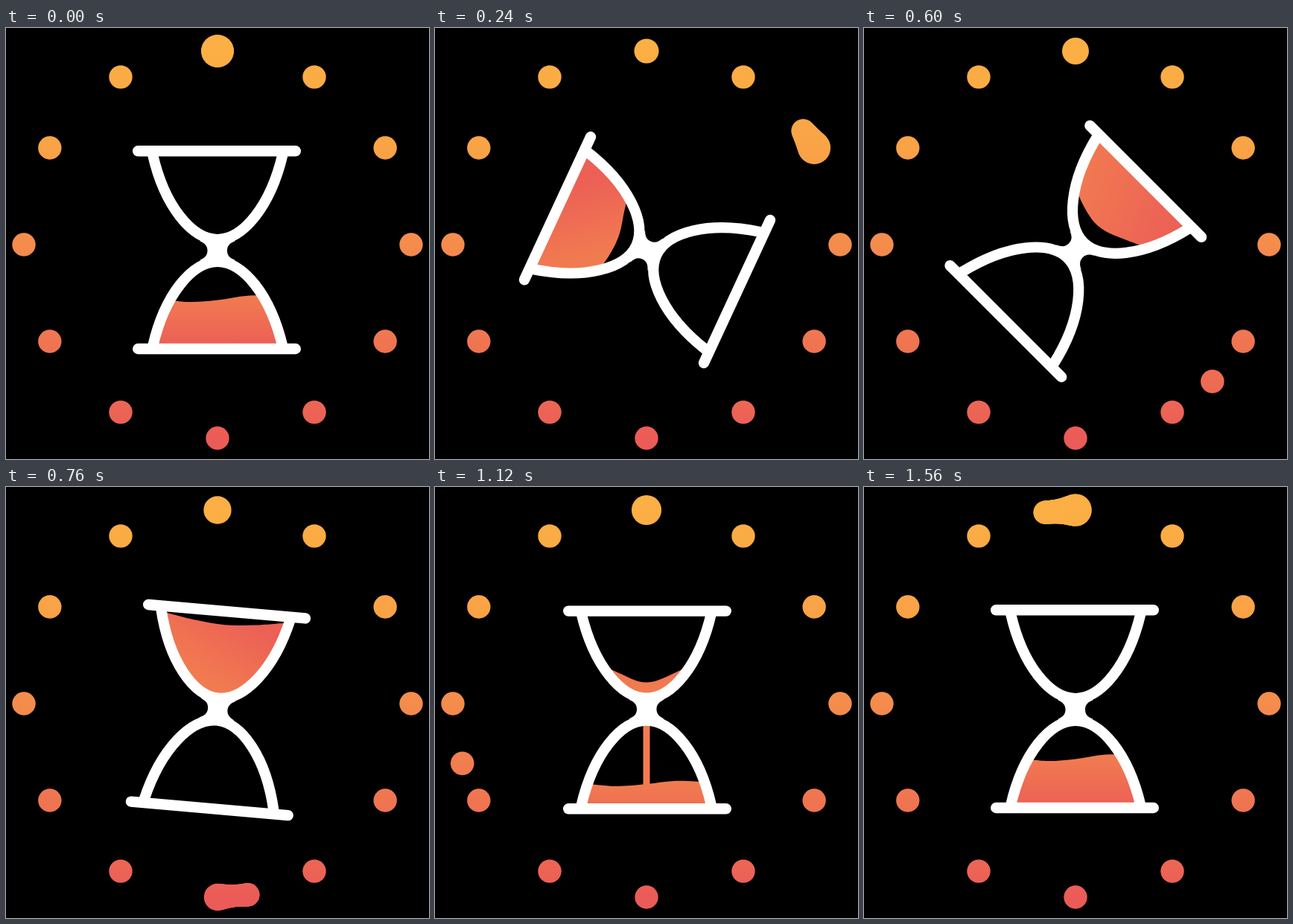
Recreate the animation shown at these times as an HTML page with a canvas. Size 568x579 px, loop 1600 ms.

```html
<!DOCTYPE html>
<html lang="en">
<head>
<meta charset="utf-8">
<title>Hourglass loader</title>
<style>
html, body { margin: 0; width: 100%; height: 100%; overflow: hidden; background: #000; }
canvas { display: block; }
</style>
</head>
<body>
<canvas id="stage" width="568" height="579"></canvas>
<script>
const ctx = document.getElementById('stage').getContext('2d');
const LOOP = 1600, STEP = 40, TAU = Math.PI * 2;
const CX = 284, RING_Y = 291, RING_R = 260, PIVOT_Y = 298.8;
const GRID = [204, 244, 284, 324, 364];

const clamp = v => Math.min(1, Math.max(0, v));
const mix = (a, b, k) => a + (b - a) * k;
const span = (t, from, to) => clamp((t - from) / (to - from));

// Eased 0..1, equal to cubic-bezier(.39, 0, .33, 1)
function ease(x) {
  let lo = 0, hi = 1, s = 0.5;
  for (let i = 0; i < 24; i++) {
    s = (lo + hi) / 2;
    const bx = 1.17 * (1 - s) ** 2 * s + 0.99 * (1 - s) * s * s + s ** 3;
    if (bx < x) lo = s; else hi = s;
  }
  return s * s * (3 - 2 * s);
}

// Interpolates rows of [time, ...values]
function track(rows, t) {
  const n = rows.findIndex(row => row[0] > t);
  if (n < 0) return rows[rows.length - 1].slice(1);
  if (n === 0) return rows[0].slice(1);
  const a = rows[n - 1], b = rows[n], k = span(t, a[0], b[0]);
  return a.slice(1).map((v, i) => mix(v, b[i + 1], k));
}

function gradient(x0, y0, x1, y1, ...stops) {
  const g = ctx.createLinearGradient(x0, y0, x1, y1);
  stops.forEach(([at, color]) => g.addColorStop(at, color));
  return g;
}

const ringFill = gradient(0, 31, 0, 551, [0, '#fbaf44'], [0.25, '#f9a346'], [0.5, '#f48c4c'],
  [0.75, '#ef7551'], [0.93, '#ec6455'], [1, '#eb5b57']);
const sandFill = (y0, y1, tilt = 0) =>
  gradient(CX + tilt, y0, CX - tilt, y1, [0, '#f17b50'], [1, '#ec6056']);

// Sand surfaces: sloshing while turning, then dropping and draining
const SLOSH = [
  [0, 363, 368, 365.6, 359.7, 360],
  [240, 355, 349, 340.5, 343.5, 356],
  [440, 360, 354.5, 361, 364, 348],
  [600, 378, 358, 344, 351, 371]
];
const UNDERSIDE = [
  [600, 227, 247, 254, 240, 220],
  [720, 262, 282, 290, 282, 262]
];
const DRAIN = [
  [600, 172, 172, 172, 172, 172],
  [800, 176, 184, 188, 184, 176],
  [960, 184, 209, 226, 210, 180],
  [1240, 262, 278, 290, 278, 262]
];

function rotate(degrees) {
  ctx.translate(CX, PIVOT_Y);
  ctx.rotate(degrees * Math.PI / 180);
  ctx.translate(-CX, -PIVOT_Y);
}

function bulb(top) {
  const y = v => top ? v : 598 - v;
  ctx.beginPath();
  ctx.moveTo(197, y(170));
  ctx.bezierCurveTo(213, y(240), 250, y(284), 284, y(284));
  ctx.bezierCurveTo(318, y(284), 355, y(240), 371.5, y(170));
}

// Smooth curve through the points, continuing the current path
function spline(points) {
  const at = i => points[Math.min(points.length - 1, Math.max(0, i))];
  ctx.lineTo(...points[0]);
  for (let i = 0; i < points.length - 1; i++) {
    const [p, a, b, q] = [at(i - 1), at(i), at(i + 1), at(i + 2)];
    ctx.bezierCurveTo(a[0] + (b[0] - p[0]) / 6, a[1] + (b[1] - p[1]) / 6,
      b[0] - (q[0] - a[0]) / 6, b[1] - (q[1] - a[1]) / 6, b[0], b[1]);
  }
}

function sand(top, upper, lower, fill) {
  const points = ys => ys.map((y, i) => [GRID[i], y]);
  ctx.save();
  bulb(top);
  ctx.clip();
  ctx.beginPath();
  spline(points(upper));
  spline(points(lower).reverse());
  ctx.fillStyle = fill;
  ctx.fill();
  ctx.restore();
}

const lowerSand = (ys, fill) => sand(false, ys, GRID.map(() => 430), fill);

function line(x0, y0, x1, y1, width, color) {
  ctx.lineCap = 'round';
  ctx.lineWidth = width;
  ctx.strokeStyle = color;
  ctx.beginPath();
  ctx.moveTo(x0, y0);
  ctx.lineTo(x1, y1);
  ctx.stroke();
}

function glass() {
  for (const top of [true, false]) {
    bulb(top);
    ctx.lineCap = 'butt';
    ctx.lineWidth = 14.2;
    ctx.strokeStyle = '#fff';
    ctx.stroke();
    const y = top ? 165.3 : 431;
    line(177.2, y, 388.8, y, 14.4, '#fff');
  }
  ctx.beginPath();
  ctx.moveTo(260, 286);
  ctx.bezierCurveTo(267, 289, 270.5, 293, 270.5, 299);
  ctx.bezierCurveTo(270.5, 305, 267, 309, 260, 312);
  ctx.lineTo(308, 312);
  ctx.bezierCurveTo(300, 309, 297, 305, 297, 299);
  ctx.bezierCurveTo(297, 293, 300, 289, 308, 286);
  ctx.fillStyle = '#fff';
  ctx.fill();
}

function sloshingSand(t) {
  lowerSand(track(SLOSH, t), sandFill(360, 425, 70 * span(t, 0, 440)));
}

function fallingSand(t) {
  if (t < 1240) {
    const settle = span(t, 600, 840);
    const fill = sandFill(mix(238, 270, settle), 173, -70 * (1 - settle));
    sand(true, track(DRAIN, t), track(UNDERSIDE, t), fill);
  }
  const height = 61 * span(t, 810, 1530);
  const base = 424.5 - height;
  const streamTop = mix(312, 355, span(t, 1200, 1320)) + Math.max(0, t - 1320) * 0.3 + 4;
  const streamEnd = Math.min(mix(312, 424, span(t, 780, 860)), base + 4);
  if (t > 780 && streamTop < streamEnd) line(CX, streamTop, CX, streamEnd, 9, '#f27b50');
  if (height > 0) {
    const wave = Math.min(height / 4, 3 + height / 36);
    const mid = 286 + height / 6;
    lowerSand(GRID.map(x => base - wave * Math.sin((x - mid) / 28.6)), sandFill(base, base + 65));
  }
}

function hourglass(t) {
  const turning = t < 600, settled = t > 1530;
  ctx.save();
  rotate(turning ? 225 * ease(t / 600) : 45 * (1 - ease(span(t, 600, 840))));
  (turning ? sloshingSand : fallingSand)(t);
  // The glass stays upside down until all sand has run through
  if (!turning && !settled) rotate(180);
  glass();
  ctx.restore();
}

function disc(x, y, r) {
  ctx.beginPath();
  ctx.arc(x, y, r, 0, TAU);
  ctx.fill();
}

const onRing = turn => [CX + RING_R * Math.sin(turn * TAU), RING_Y - RING_R * Math.cos(turn * TAU)];

function ring(t) {
  const [mx, my] = onRing(t / LOOP);
  ctx.fillStyle = ringFill;
  disc(mx, my, 15.8);
  for (let i = 0; i < 12; i++) {
    const [x, y] = onRing(i / 12);
    const delay = Math.abs(t - i * LOOP / 12);
    const away = Math.min(delay, LOOP - delay);
    let r = 15.7 + 6.3 * (1 - span(away, 28, 48));
    if (i === 0) r = Math.max(r, 15.6 + 6.4 * t / LOOP);
    disc(x, y, r);
    // Liquid bridge to the passing dot
    const gap = Math.hypot(mx - x, my - y);
    if (gap < 48) {
      for (let k = 0; k <= 1; k += 0.04) {
        const pinch = Math.max(0, gap - 24) / 9 * Math.sin(k * Math.PI);
        disc(mix(mx, x, k), mix(my, y, k), mix(15.8, r, k) - pinch);
      }
    }
  }
}

function draw() {
  const t = Math.floor(performance.now() % LOOP / STEP) * STEP;
  ctx.fillStyle = '#000';
  ctx.fillRect(0, 0, 568, 579);
  ring(t);
  hourglass(t);
  requestAnimationFrame(draw);
}
draw();
</script>
</body>
</html>
```
